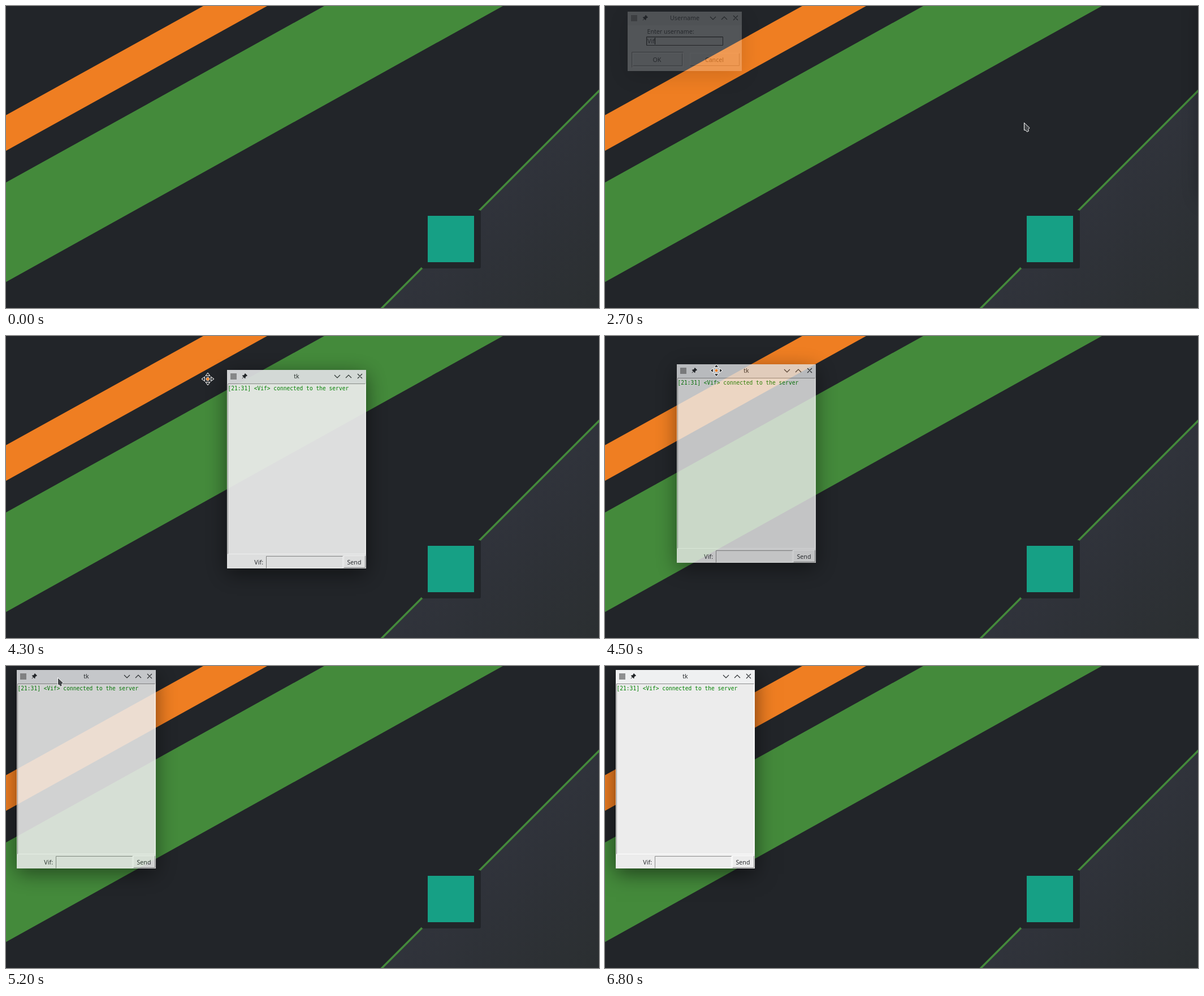
Animation, 1049 px wide and 534 px high, one loop 8 s. Source, as an HTML page:

```html
<!DOCTYPE html>
<html>
<head>
<meta charset="utf-8">
<style>
html, body { margin: 0; width: 100%; height: 100%; overflow: hidden; background: #222529; }
svg { position: absolute; left: 0; top: 0; }
.window {
  position: absolute; left: 0; top: 0; overflow: visible; background: #ececec;
  box-shadow: 0 9px 34px rgba(0, 0, 0, .55);
}
text { font: 10.67px "Noto Sans", sans-serif; fill: #2b2e31; white-space: pre; }
.mono { font: 9.6px "DejaVu Sans Mono", monospace; fill: #008000; }
.mid { text-anchor: middle; }
.end { text-anchor: end; }
</style>
</head>
<body>
<svg width="1049" height="534">
  <linearGradient id="slate" gradientUnits="userSpaceOnUse" x1="857" y1="342" x2="1049" y2="534">
    <stop stop-color="#30333b"/><stop offset="1" stop-color="#2b2f31"/>
  </linearGradient>
  <path fill="#222529" d="M0 0H1049V534H0Z"/>
  <path fill="#ef7e22" d="M0 193L349 0H462L0 256Z"/>
  <path fill="#448a3b" d="M0 312L563 0H879L0 488Z"/>
  <path fill="url(#slate)" d="M1049 150V534H665Z"/>
  <path stroke="#448a3b" stroke-width="3.5" d="M1059 140L655 544"/>
  <rect x="735" y="361" width="105" height="103" rx="3" fill="#222529"/>
  <path fill="#16a085" d="M746 371h82v82h-82Z"/>
</svg>
<div class="window" id="dialog"></div>
<div class="window" id="chat"></div>
<svg width="1049" height="534">
  <path id="arrow" fill="#45484b" stroke="#fff" d="M.5 .5V13.5L3 13.5L5.5 16.5L8.5 15L7.5 12.5L10 9.5Z"/>
  <g id="mover">
    <g id="heads" fill="#34373a" stroke="#fff"></g>
    <circle r="3" fill="#ef7e22" stroke="#e8e8e8"/>
  </g>
</svg>
<script>
const $ = id => document.getElementById(id);
const USER = 'Vif';

const label = (x, y, text, cls = '') => `<text x="${x}" y="${y}" class="${cls}">${text}</text>`;

// Two-tone edge: raised when up is true, sunken otherwise
function bevel(x, y, w, h, up) {
  const [a, b] = up ? ['#fff', '#8c8c8c'] : ['#8c8c8c', '#fff'];
  return `<g fill="none"><path stroke="${b}" d="M${x + .5} ${y + h - .5}h${w - 1}v${1 - h}"/>
    <path stroke="${a}" d="M${x + .5} ${y + h - .5}v${1 - h}h${w - 1}"/></g>`;
}

function buildWindow(id, w, h, title, content) {
  const el = $(id);
  el.style.width = w + 'px';
  el.style.height = h + 'px';
  el.innerHTML = `<svg width="${w}" height="${h}">
    <path class="bar" fill="#dee0e2" d="M0 0H${w}V24H0Z"/>
    <path fill="#8e8f90" d="M6 6h11v11h-11Z"/>
    <path fill="#232629" d="M32 6l4 4-1 1-1 0-1.5 2 0 2-1 0-2-2-2.5 2.5-.5-.5 2.5-2.5-2-2 0-1 2 0 2-1.5 0-1Z"/>
    <g fill="none" stroke="#2b2e31" stroke-width="1.2">
      <path d="M${w - 56} 9l5 5 5-5m10 5l5-5 5 5m11-7l8 8m0-8l-8 8"/>
    </g>
    ${label(w / 2, 15, title, 'mid')}${content}</svg>`;
}

buildWindow('dialog', 202, 105, 'Username',
  label(34.5, 39, 'Enter username:') +
  '<path fill="none" stroke="#222" d="M33.5 44.5h135v15h-135Z"/>' +
  '<path fill="none" stroke="#aaa" d="M34.5 58.5v-13h133"/>' +
  label(35, 56, '', 'typed') +
  '<rect id="caret" y="46" width="1.3" height="12" fill="#111"/>' +
  bevel(7, 71, 92, 28, false) + bevel(9, 73, 88, 23, true) + label(52, 88.5, 'OK', 'mid') +
  bevel(110, 73, 88, 23, true) + label(153.5, 88.5, 'Cancel', 'mid'));

buildWindow('chat', 246, 351, 'tk',
  bevel(1, 24, 244, 302, false) +
  label(1.5, 36, `[21:31] &lt;${USER}&gt; connected to the server`, 'mono') +
  label(64, 343.5, USER + ':', 'end') +
  bevel(69, 329, 136, 22, false) +
  bevel(206, 328, 39, 22, true) + label(225, 343.5, 'Send', 'mid'));

$('heads').innerHTML = [0, 90, 180, 270]
  .map(a => `<path transform="rotate(${a})" d="M0 -11L4 -5.5H-4Z"/>`).join('');

const typed = document.querySelector('.typed');
const chatBar = $('chat').querySelector('.bar');

// Value of the last [tick, value] entry that has been reached
const hold = (keys, n) => keys.reduce((v, [at, next]) => n >= at ? next : v, null);

const dialogAlpha = [[0, 0], [7, .6], [8, 1], [27, .24], [28, .05], [30, 0]];
const chatAlpha = [[0, 0], [27, .7], [28, 1], [43, .93], [44, .86], [45, .8], [52, .87], [54, .96], [55, 1]];
const chatTitle = [[0, '#dee0e2'], [67, '#e7e9ea'], [68, '#eff0f1']];
const letters = [[0, 0], [15, 1], [16, 2], [17, 3]];
const caretOn = [[0, 1], [13, 0], [15, 1], [18, 0], [22, 1]];
const arrowAt = [[0, null], [10, [778, 300]], [11, [741, 206]], [33, [785, 180]], [34, null],
  [52, [91, 20]], [54, [688, 300]], [55, null]];

function place(el, pos) {
  el.style.display = pos ? '' : 'none';
  if (pos) el.style.transform = `translate(${pos[0]}px, ${pos[1]}px)`;
}

function draw(now) {
  const n = Math.floor(now % 8000 / 100);

  place($('dialog'), [40, 10]);
  $('dialog').style.opacity = hold(dialogAlpha, n);
  typed.textContent = USER.slice(0, hold(letters, n));
  $('caret').setAttribute('x', 35 + typed.getComputedTextLength());
  $('caret').style.opacity = hold(caretOn, n);

  // The chat window waits beyond the right edge, then is dragged to the corner
  const left = 1 - Math.min(Math.max(n - 43, 0) / 7, 1);
  const x = Math.round(19 + 372 * left ** 3.68);
  const y = Math.round(7 + 53 * left ** .62);
  place($('chat'), n < 43 ? [1058, -20] : [x, y]);
  $('chat').style.opacity = hold(chatAlpha, n);
  chatBar.setAttribute('fill', hold(chatTitle, n));

  place($('arrow'), hold(arrowAt, n));
  const dragging = n >= 43 && n < 52;
  place($('mover'), dragging ? (n === 43 ? [x - 34, y + 16] : [x + 70, y + 11]) : null);
}

const start = performance.now();
function loop() {
  draw(performance.now() - start);
  requestAnimationFrame(loop);
}
loop();
</script>
</body>
</html>
```
